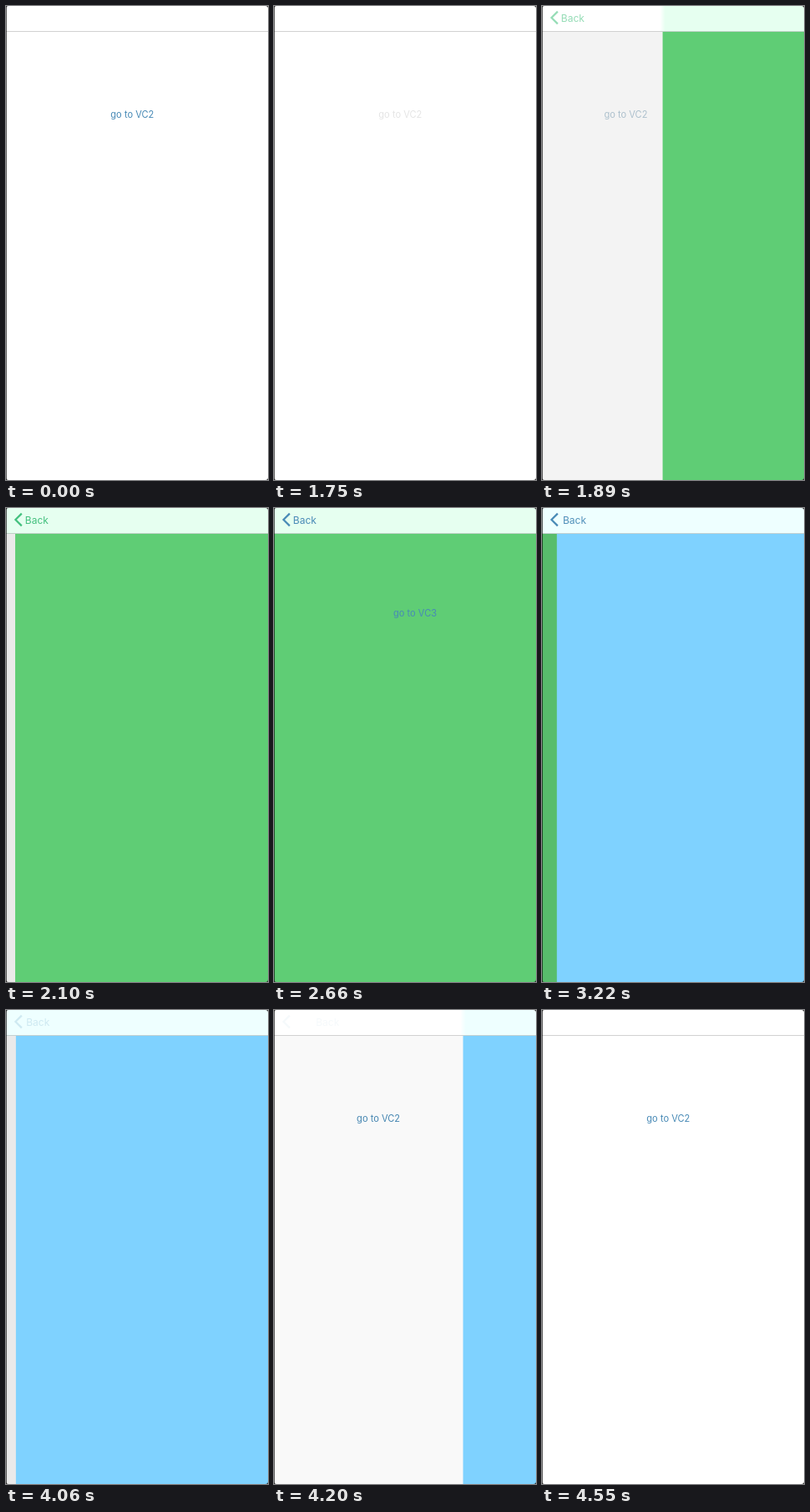
Write an HTML page with a canvas that moves like this. It is 314 by 568 pixels and loops after 5040 ms.

```html
<!DOCTYPE html>
<html lang="en">
<head>
<meta charset="utf-8">
<title>Navigation push and pop</title>
<style>
  html, body { margin: 0; width: 100%; height: 100%; overflow: hidden; background: #fff; }
  canvas { display: block; width: 314px; height: 568px; }
</style>
</head>
<body>
<canvas id="stage" width="314" height="568"></canvas>
<script>
const W = 314, H = 568, BAR = 30;
const LOOP = 5040, TICK = 70;
const PUSH_GREEN = 1777, PUSH_BLUE = 2933, POP = 4041;
const PARALLAX = 0.3, BACK_X = 22.8, BACK_TRAVEL = 38;
const ctx = document.getElementById('stage').getContext('2d');

const BLUE = [72, 138, 182], GREEN = [60, 190, 120], PALE = [229, 229, 229];
const screens = {
  home:  { fill: '#ffffff', bar: '#ffffff', label: 'go to VC2', x: 125.3, y: 134 },
  green: { fill: '#5fcd75', bar: '#e6fff0', label: 'go to VC3', x: 143, y: 130 },
  blue:  { fill: '#7fd2ff', bar: '#eeffff' }
};

const clamp = v => Math.max(0, Math.min(1, v));
const ramp = (t, from, to) => clamp((t - from) / (to - from));
const mix = (a, b, k) => a.map((v, i) => v + (b[i] - v) * k);
const rgb = c => `rgb(${c.map(Math.round).join(',')})`;

// Critically damped spring, 0 to 1, at rest once within a pixel
function spring(t, start) {
  const s = 16 * Math.max(0, t - start) / 1000;
  const left = (1 + s) * Math.exp(-s);
  return left < 1 / W ? 1 : 1 - left;
}

function text(str, x, y, size, color, alpha) {
  ctx.globalAlpha = alpha;
  ctx.fillStyle = color;
  ctx.font = `${size}px Inter, "Liberation Sans", sans-serif`;
  ctx.fillText(str, x, y);
  ctx.globalAlpha = 1;
}

function drawScreen(screen, x, label) {
  ctx.fillStyle = screen.fill;
  ctx.fillRect(x, BAR, W, H - BAR);
  if (screen.label && label.alpha > 0) {
    text(screen.label, screen.x + x, screen.y, 11.1, label.color, label.alpha);
  }
}

// The lower screen trails behind the upper one; cover is how far the upper one is in
function drawPair(lower, upper, cover, lowerLabel, upperLabel) {
  const edge = W * (1 - cover);
  if (cover < 1) {
    ctx.fillStyle = lower.fill;
    ctx.fillRect(0, BAR, W, H - BAR);
    drawScreen(lower, -W * PARALLAX * cover, lowerLabel);
    ctx.fillStyle = `rgba(0,0,0,${0.085 * cover})`;
    ctx.fillRect(0, BAR, W, H - BAR);
  }
  if (cover > 0) drawScreen(upper, edge, upperLabel);
  drawBar(lower, upper, edge);
}

// Colours under the translucent bar bleed a little across the moving edge
function drawBar(lower, upper, edge) {
  const blend = ctx.createLinearGradient(edge - 3, 0, edge + 3, 0);
  blend.addColorStop(0, edge < 20 ? upper.bar : lower.bar);
  blend.addColorStop(1, edge < W ? upper.bar : lower.bar);
  ctx.fillStyle = blend;
  ctx.fillRect(0, 0, W, BAR + 1);
  ctx.fillStyle = 'rgba(0,0,0,0.18)';
  ctx.fillRect(0, BAR, W, 1);
}

function drawChevron(color, alpha) {
  ctx.globalAlpha = alpha;
  ctx.strokeStyle = color;
  ctx.lineWidth = 2.2;
  ctx.beginPath();
  ctx.moveTo(18.8, 6.6);
  ctx.lineTo(11.4, 14);
  ctx.lineTo(18.8, 21.4);
  ctx.stroke();
  ctx.globalAlpha = 1;
}

function drawBackLabel(x, color, alpha) {
  ctx.save();
  ctx.beginPath();
  ctx.rect(15, 0, W, BAR);
  ctx.clip();
  text('Back', x, 18.6, 12, color, alpha);
  ctx.restore();
}

function drawNavItems(t, tint, toGreen, toBlue, toHome) {
  const color = rgb(tint);
  if (t < POP) {
    const pressed = t >= 3920 ? 0.2 : 1;
    drawChevron(color, toGreen * pressed);
    drawBackLabel(BACK_X - 46 * toBlue, color, toGreen * (1 - toBlue));
    drawBackLabel(BACK_X + BACK_TRAVEL * (1 - toBlue), color, toBlue * pressed);
  } else {
    const alpha = 0.2 * (1 - toHome);
    drawChevron(color, alpha);
    drawBackLabel(BACK_X + BACK_TRAVEL * toHome, color, alpha);
  }
}

function drawDeviceEdge() {
  ctx.fillStyle = 'rgba(0,0,0,0.6)';
  ctx.fillRect(0, 0, 1, H);
  ctx.fillStyle = '#222';
  ctx.beginPath();
  ctx.rect(0, 0, W, H);
  ctx.roundRect(0, 0, W, H, 3);
  ctx.fill('evenodd');
}

function render(t) {
  const toGreen = spring(t, PUSH_GREEN);
  const toBlue = spring(t, PUSH_BLUE);
  const toHome = spring(t, POP);
  const tintShift = ramp(t, 2100, 2240);
  const rest = { color: rgb(BLUE), alpha: 1 };

  if (t < 2590) {
    const color = t < 1750 ? BLUE : mix(PALE, BLUE, ramp(t, 1750, 2220));
    drawPair(screens.home, screens.green, toGreen,
      { color: rgb(color), alpha: 1 }, { color: rgb(BLUE), alpha: tintShift });
  } else if (t < POP) {
    const alpha = t < 2870 ? 1 : 0.2 + 0.8 * ramp(t, 2920, 3390);
    drawPair(screens.green, screens.blue, toBlue, { color: rgb(BLUE), alpha }, rest);
  } else {
    drawPair(screens.home, screens.blue, 1 - toHome, rest, rest);
  }
  drawNavItems(t, mix(GREEN, BLUE, tintShift), toGreen, toBlue, toHome);
  drawDeviceEdge();
}

const begin = performance.now();
function frame() {
  const t = (performance.now() - begin) % LOOP;
  render(Math.floor(t / TICK) * TICK);
  requestAnimationFrame(frame);
}
frame();
</script>
</body>
</html>
```
